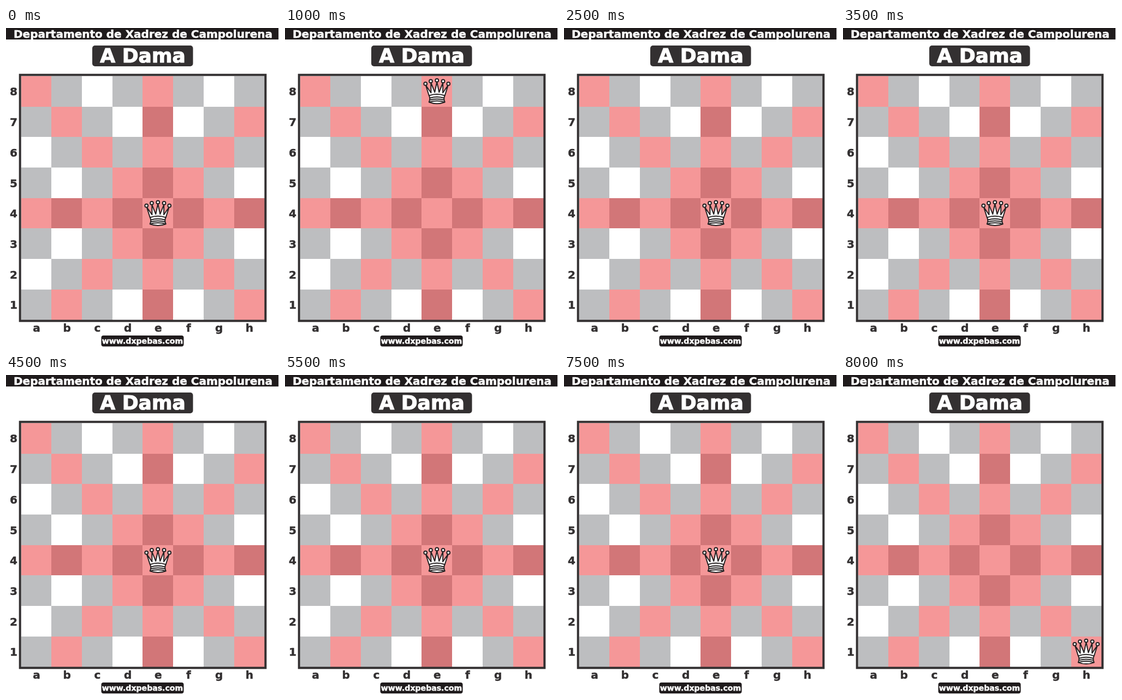
Animation, 500 px wide and 583 px high, one loop 8500 ms. Source, as an HTML page:

```html
<!DOCTYPE html>
<html lang="pt">
<head>
<meta charset="utf-8">
<title>A Dama</title>
<style>
  html, body { margin: 0; width: 100%; height: 100%; overflow: hidden; background: #fff; }
  svg { display: block; width: 100%; height: 100%; }
  text { font-family: "DejaVu Sans", Verdana, sans-serif; font-weight: bold; stroke-width: .5; }
  .light { fill: #fff; stroke: #fff; }
  .dark { fill: #333031; stroke: #333031; text-anchor: middle; font-size: 20px; }
  #queen { fill: #fff; stroke: #262223; stroke-width: 2; stroke-linejoin: round; }
</style>
</head>
<body>
<svg viewBox="0 0 500 583">
  <rect width="500" height="583" fill="#fff"/>
  <rect width="499" height="21" fill="#1f1b1c"/>
  <text class="light" x="14" y="17.5" font-size="20">Departamento de Xadrez de Campolurena</text>
  <rect x="158" y="32" width="184.5" height="38" rx="5" fill="#333031"/>
  <text class="light" x="250.5" y="63" font-size="36" text-anchor="middle" style="stroke-width:1.2">A Dama</text>
  <g id="board"></g>
  <rect x="25.7" y="85.7" width="449.6" height="449.6" fill="none" stroke="#333031" stroke-width="4"/>
  <rect x="174.5" y="562" width="151" height="20" rx="4" fill="#1f1b1c"/>
  <text class="light" x="250" y="577" font-size="14.1" text-anchor="middle">www.dxpebas.com</text>
  <g id="queen">
    <path d="M-14.5 8L-20.5-11L-10.8 3L-11-15.500L-4 2L0-17L4 2L11-15.500L10.800 3L20.500-11L14.500 8Q11.500 13 14.500 20Q0 25.500-14.500 20Q-11.500 13-14.500 8Z"/>
    <path fill="none" d="M-14.500 8Q0 3 14.500 8M-13 12.500Q0 8.500 13 12.500M-13 16Q0 12.500 13 16M-14.500 20Q0 15.500 14.500 20"/>
  </g>
</svg>
<script>
const NS = "http://www.w3.org/2000/svg";
const FILES = "abcdefgh", CELL = 55.7, LEFT = 27.6, TOP = 87.6;
const HOME = "e4", STEP = 500, LOOP = 8500;
const VISITS = ["e8", "e1", "a4", "h4", "h7", "b1", "a8", "h1"];
const board = document.getElementById("board");
const queen = document.getElementById("queen");

function add(parent, tag, attrs, text) {
  const el = document.createElementNS(NS, tag);
  for (const key in attrs) el.setAttribute(key, attrs[key]);
  if (text) el.textContent = text;
  parent.appendChild(el);
  return el;
}

const centerX = col => LEFT + (col + 0.5) * CELL;
const centerY = rank => TOP + (8.5 - rank) * CELL;

function squareColor(col, rank) {
  const dx = col - 4, dy = rank - 4;
  const reached = !dx || !dy || Math.abs(dx) === Math.abs(dy);
  const dark = (col + rank) % 2 === 1;
  if (reached) return dark ? "#d27678" : "#f59798";
  return dark ? "#bdbec0" : "#fff";
}

for (let rank = 1; rank <= 8; rank++) {
  for (let col = 0; col < 8; col++) {
    const x = Math.round(LEFT + col * CELL), y = Math.round(TOP + (8 - rank) * CELL);
    add(board, "rect", { x, y, width: 56, height: 56, fill: squareColor(col, rank) });
  }
  add(board, "text", { class: "dark", x: 14, y: centerY(rank) + 8 }, String(rank));
  add(board, "text", { class: "dark", x: centerX(rank - 1) + 0.5, y: 555 }, FILES[rank - 1]);
}

for (const [x, y] of [[-21, -13.5], [-11.3, -18.3], [0, -19.8], [11.3, -18.3], [21, -13.5]])
  add(queen, "circle", { cx: x, cy: y, r: 2.9 });

// The queen jumps out on every even step and returns on the next one.
function render(time) {
  const step = Math.floor((time % LOOP) / STEP);
  const away = step >= 2 && step % 2 === 0;
  const square = away ? VISITS[step / 2 - 1] : HOME;
  const x = centerX(FILES.indexOf(square[0])), y = centerY(+square[1]);
  queen.setAttribute("transform", `translate(${x} ${y})`);
}

const start = performance.now();
function tick() {
  render(performance.now() - start);
  requestAnimationFrame(tick);
}
tick();
</script>
</body>
</html>
```
